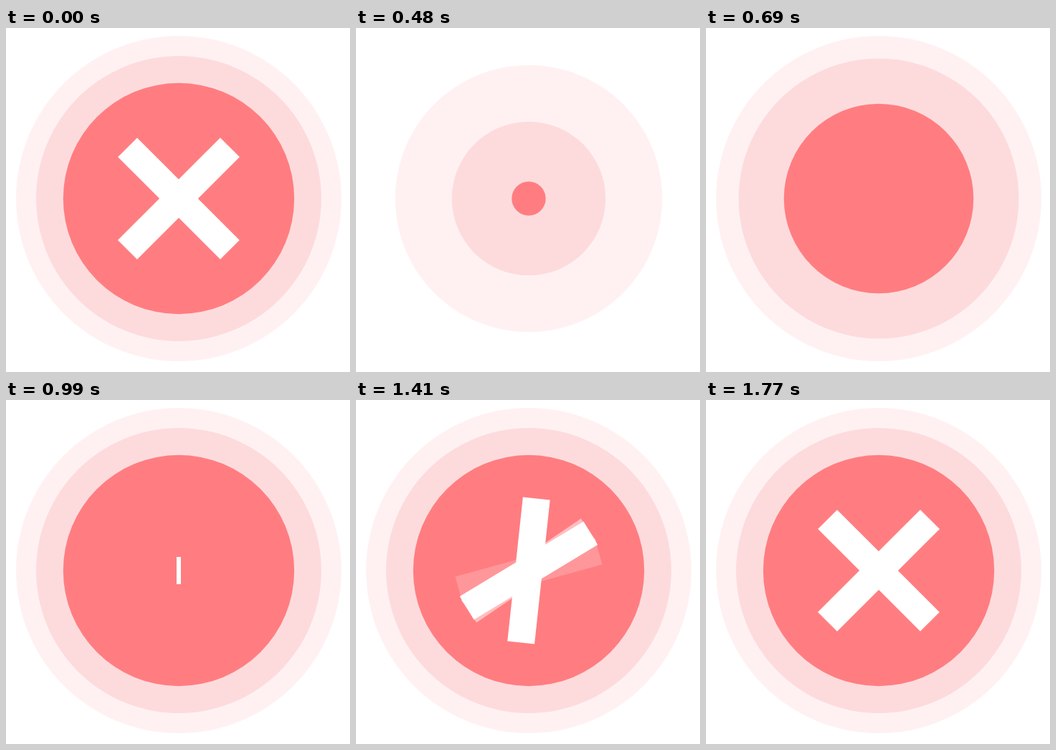
Animation, 480 px wide and 480 px high, one loop 2250 ms. Source, as an HTML page with a canvas:

```html
<!DOCTYPE html>
<html lang="en">
<head>
<meta charset="utf-8">
<title>Error mark</title>
<style>
  html, body { margin: 0; width: 100%; height: 100%; overflow: hidden; background: #fff; }
  canvas { display: block; width: 480px; height: 480px; }
</style>
</head>
<body>
<canvas id="stage"></canvas>
<script>
const SIZE = 480, LOOP = 2250, STEP = 30, INTRO = 120;
const CX = 241, CY = 238;
const BAR = { length: 202, width: 38, start: 955, span: 255 };

const rings = [
  { radius: 227, color: '#fff1f2', start: 114 },
  { radius: 199, color: '#fddbdd', start: 204 },
  { radius: 161.2, color: '#ff7d80', start: 324 }
];
const RING_SPAN = 552;

// Two faint trails follow the first bar; angles are counterclockwise degrees.
const bars = [
  { turn: 225, start: 1319, alpha: 0.2 },
  { turn: 225, start: 1281, alpha: 0.5 },
  { turn: 135, start: 1256, alpha: 1 },
  { turn: 225, start: 1221, alpha: 1 }
];
const TURN_SPAN = 450;

const canvas = document.getElementById('stage');
const ctx = canvas.getContext('2d');
const dpr = window.devicePixelRatio || 1;
canvas.width = canvas.height = SIZE * dpr;

// cubic-bezier(0.5, 0, 0.45, 1)
function ease(x) {
  if (x <= 0) return 0;
  if (x >= 1) return 1;
  let lo = 0, hi = 1;
  for (let i = 0; i < 24; i++) {
    const s = (lo + hi) / 2, r = 1 - s;
    if (1.5 * s * r * r + 1.35 * s * s * r + s * s * s < x) lo = s;
    else hi = s;
  }
  return lo * lo * (3 - 2 * lo);
}

const progress = (t, start, span) => ease((t - start) / span);

function drawRing(ring, t) {
  const r = ring.radius * progress(t, ring.start, RING_SPAN);
  if (r <= 0) return;
  ctx.fillStyle = ring.color;
  ctx.beginPath();
  ctx.arc(CX, CY, r, 0, Math.PI * 2);
  ctx.fill();
}

function drawBar(bar, length, t) {
  const angle = bar.turn * progress(t, bar.start, TURN_SPAN);
  ctx.save();
  ctx.translate(CX, CY);
  ctx.rotate(-angle * Math.PI / 180);
  ctx.globalAlpha = bar.alpha;
  ctx.fillStyle = '#fff';
  ctx.fillRect(-length / 2, -BAR.width / 2, length, BAR.width);
  ctx.restore();
}

function draw(t) {
  ctx.setTransform(dpr, 0, 0, dpr, 0, 0);
  ctx.fillStyle = '#fff';
  ctx.fillRect(0, 0, SIZE, SIZE);
  rings.forEach(ring => drawRing(ring, t));
  const length = BAR.length * progress(t, BAR.start, BAR.span);
  if (length > 0) bars.forEach(bar => drawBar(bar, length, t));
}

const origin = performance.now();

function tick(now) {
  const t = Math.floor((Math.max(0, now - origin) % LOOP) / STEP) * STEP;
  draw(t < INTRO ? LOOP : t);
  requestAnimationFrame(tick);
}

draw(LOOP);
requestAnimationFrame(tick);
</script>
</body>
</html>
```
